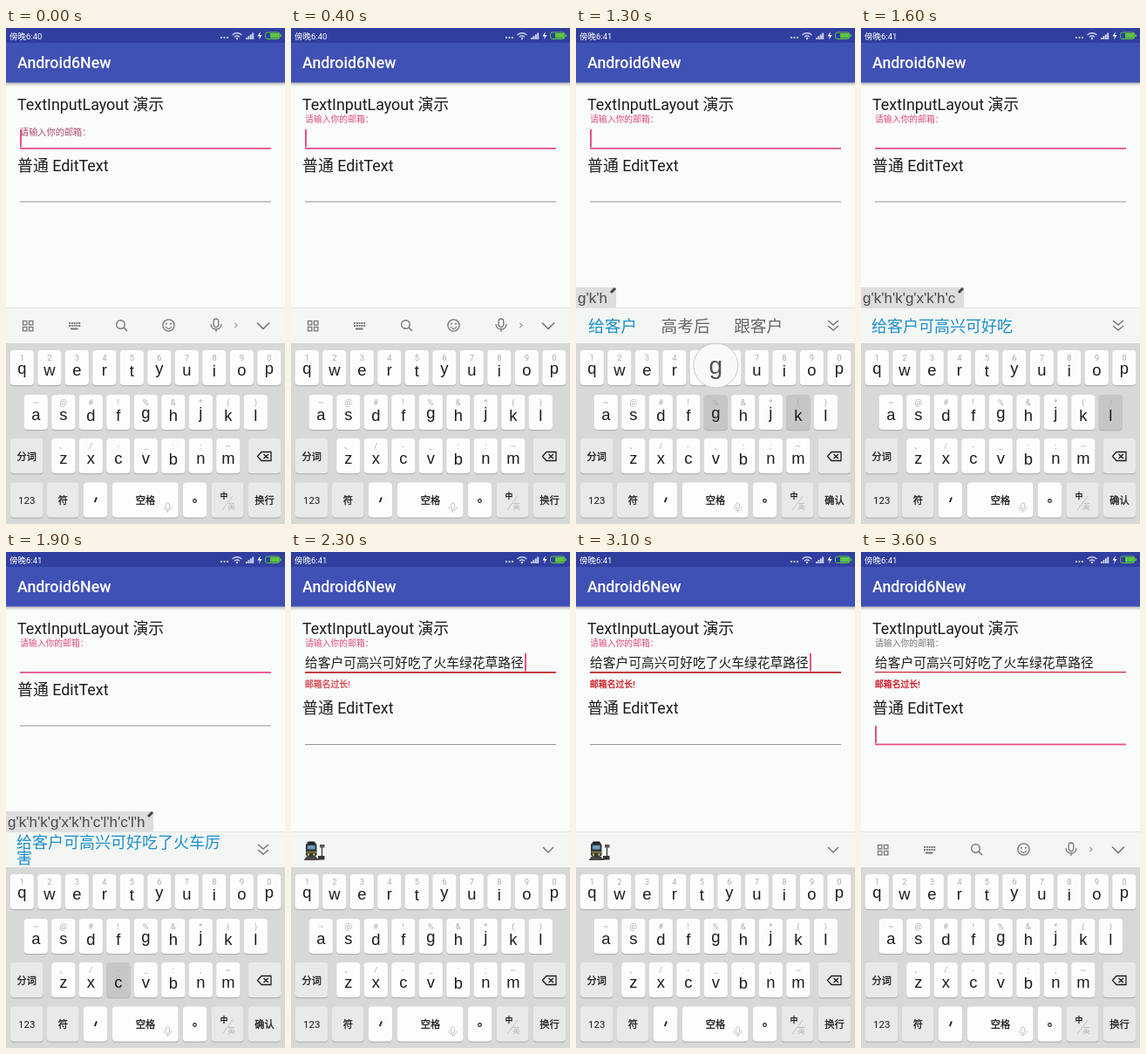
Recreate the animation shown at these times as an HTML page. Size 320 by 568 pixels, loop 4000 ms.

```html
<!DOCTYPE html>
<html lang="zh-CN">
<head>
<meta charset="utf-8">
<style>
  html, body { margin: 0; width: 100%; height: 100%; overflow: hidden; }
  body { position: relative; font-family: Roboto, "Noto Sans CJK SC", "Noto Sans CJK", sans-serif; }
  svg { display: block; width: 320px; height: 568px; }
  .latin, #pinyin { font-family: "Liberation Sans", Arial, sans-serif; }
  .label { stroke: #1c1c1c; stroke-width: .3px; }
  .error { stroke: #cc1420; stroke-width: .3px; }
  #pinyin {
    position: absolute; left: 0; top: 297px; height: 23px; padding: 0 10px 0 2px;
    font-size: 17px; line-height: 25px; color: #4a4a4a; background: #dcdddc; white-space: nowrap;
  }
  #pinyin::after {
    content: ""; position: absolute; right: 2px; top: 0; width: 3px; height: 7px;
    background: #444; transform: rotate(45deg);
  }
  #words {
    position: absolute; left: 14px; top: 322px; height: 40px; max-width: 236px;
    display: flex; align-items: center; gap: 27.5px; color: #666; white-space: nowrap;
    font-size: 18.7px; line-height: 18px;
  }
  #words.long { left: 12px; white-space: normal; font-size: 18px; }
  #words :first-child { color: #1d8fcb; }
</style>
</head>
<body>
<svg id="screen" viewBox="0 0 320 568"></svg>
<div id="pinyin"></div>
<div id="words"></div>
<script>
const LOOP = 4000, STEP = 100;
const COMMIT = 2200, REFOCUS = 3400;
const PINK = '#e4528c', RED = '#c02a30', GREY = '#777';
const SENTENCE = '给客户可高兴可好吃了火车厉害';
const ENTRY = '给客户可高兴可好吃了火车绿花草路径';
const LETTERS = 'gkhkgxkhclhclhclj';
const ROWS = [
  ['qwertyuiop', '1234567890', 18.3, 369],
  ['asdfghjkl', '~@#!%&*()', 34.3, 420],
  ['zxcvbnm', '、/-_:;~', 65.8, 470],
];
const $ = id => document.getElementById(id);

const rect = (x, y, w, h, fill, more = '') =>
  `<rect x="${x}" y="${y}" width="${w}" height="${h}" fill="${fill}" ${more}/>`;
const text = (x, y, size, fill, str, more = '') =>
  `<text x="${x}" y="${y}" font-size="${size}" fill="${fill}" ${more}>${str.replace('&', '&amp;')}</text>`;
const mid = (x, y, size, fill, str, more = '') =>
  text(x, y, size, fill, str, 'text-anchor="middle" ' + more);
const line = (d, stroke, width = 1.4, more = '') =>
  `<path d="${d}" fill="none" stroke="${stroke}" stroke-width="${width}" ${more}/>`;
const dot = (x, y, r, fill, more = '') =>
  `<circle cx="${x}" cy="${y}" r="${r}" fill="${fill}" ${more}/>`;

const key = (x, y, w, fill = '#fcfdfc') =>
  rect(x, y + 1.3, w, 40, '#b3b5b3', 'rx="4"') + rect(x, y, w, 40, fill, 'rx="4"');

const mic = (x, y, s, color) =>
  `<g transform="translate(${x} ${y}) scale(${s})">` +
  rect(-2.8, -7, 5.6, 9.5, 'none', `rx="2.8" stroke="${color}" stroke-width="1.3"`) +
  line('M-6-1C-6 7 6 7 6-1M0 5V8', color, 1.3) + '</g>';

function statusBar(t) {
  const pale = '#cdd2ee', green = '#5cc443';
  return rect(0, 0, 320, 17, '#303f9f') +
    text(4, 12.5, 9.5, '#fff', t < 1000 ? '傍晚6:40' : '傍晚6:41') +
    [247, 250.5, 254].map(x => dot(x, 11, 1, '#fff')).join('') +
    line('M259.5 8Q265 3.5 270.5 8M262 10.2Q265 7.8 268 10.2', pale, 1.3) + dot(265, 12, 1.2, pale) +
    [0, 1, 2, 3].map(i => rect(275 + i * 2.4, 11 - i * 1.8, 2, 2 + i * 1.8, pale)).join('') +
    '<path d="M292 4L288.5 9.5H291L290 13.5L293.5 8H291Z" fill="#fff"/>' +
    rect(297.5, 5, 16.5, 7.5, 'none', `rx="2.5" stroke="${green}"`) +
    rect(303, 6, 10.5, 5.5, green) + rect(314.5, 7.5, 1.5, 2.5, green);
}

function form(t) {
  const done = t >= COMMIT, second = t >= REFOCUS;
  const drop = done ? 21.5 : 0;
  const caretOn = t % 1000 < 500;
  const hint = t < STEP ? [16, 122.8, 10.2, '#b04a70'] : [16, 107.8, 9.84, second ? GREY : '#e0487f'];
  let out = text(13, 94, 17.9, '#1c1c1c', 'TextInputLayout 演示') +
    text(...hint, '请输入你的邮箱：') +
    rect(16, 137, 288, second ? 1.2 : 1.8, done ? RED : PINK) +
    text(13, 163.8 + drop, 17.9, '#1c1c1c', '普通 EditText') +
    (second ? rect(16, 219.5, 288, 1.8, PINK) : rect(16, 198.5 + drop, 288, 1, '#949494'));
  if (done) {
    out += text(16, 131.8, 14.76, '#1c1c1c', ENTRY) +
      text(16, 155.2, 9.84, '#cc1420', '邮箱名过长!', `class="error" opacity="${Math.min(1, (t - 2100) / 250)}"`);
  }
  if (second) out += rect(16, 199, 2, 20, PINK);
  else if (caretOn) out += rect(done ? 268 : 16, 116, 2, 20.5, PINK);
  return out;
}

function train() {
  return rect(17, 333, 12.5, 16, '#2f3b3f', 'rx="3"') + rect(19, 331.5, 8.5, 3, '#222', 'rx="1"') +
    rect(19, 336, 8.5, 4.5, '#6f9dba', 'rx="1"') + rect(17.5, 343, 11.5, 1.5, '#9a7a3a') +
    dot(20, 346.5, 1.2, '#e0b84b') + dot(26.5, 346.5, 1.2, '#e0b84b') +
    '<path d="M17.5 349H29L32 353H14.500Z" fill="#4a4542"/>' +
    line('M35.500 337V349', '#444', 1.5) + rect(33, 335, 5.5, 3.5, '#555') + rect(31, 348, 7.5, 4.5, '#333');
}

function toolbar(t, composing) {
  let out = rect(0, 320, 320, 41, '#f4f6f4') + rect(0, 320, 320, 1, '#e2e4e2');
  if (composing) return out + line('M289 335L295 340L301 335M289 341L295 346L301 341', GREY, 1.5);
  if (t >= COMMIT && t < REFOCUS) return out + train() + line('M289 338L295 344L301 338', GREY, 1.5);
  for (const x of [19.5, 26.5]) for (const y of [335.5, 342.5])
    out += rect(x, y, 4.4, 4.4, 'none', `stroke="${GREY}" stroke-width="1.3"`);
  for (let i = 0; i < 10; i++)
    out += rect(72 + i % 5 * 2.8, 337 + (i / 5 | 0) * 3, 2, 2, GREY);
  return out + rect(74, 343.5, 8.5, 2, GREY) +
    dot(131.5, 339.5, 4.8, 'none', `stroke="${GREY}" stroke-width="1.4"`) + line('M135 343L139 347', GREY, 1.6) +
    dot(186.5, 340.5, 6.6, 'none', `stroke="${GREY}" stroke-width="1.4"`) +
    dot(184, 338.8, 1, GREY) + dot(189, 338.8, 1, GREY) + line('M183 342Q186.5 347 190 342', GREY, 1.3) +
    mic(241, 340, 1, GREY) + line('M262.5 338L265 340.5L262.5 343', '#999', 1.1) +
    line('M288 337.5L295 344.5L302 337.5', GREY, 1.7);
}

function keyboard(composing, pressed, popup) {
  const side = '#e8eae8', ink = '#1c1c1c';
  const label = (x, y, str) => mid(x, y, 11.2, ink, str, 'class="label"');
  let out = rect(0, 361, 320, 207, '#d7d9d7'), bubble = '';
  for (const [letters, marks, x0, y] of ROWS) [...letters].forEach((c, i) => {
    const x = x0 + i * 31.5;
    const shift = 'gjpqy'.includes(c) ? -2 : 'tdfhiklb'.includes(c) ? 1 : 0;
    out += key(x - 13.6, y, 27.2, pressed.includes(c) ? '#c5c7c5' : undefined) +
      mid(x, y + 12, 9.5, '#adadad', marks[i]) +
      mid(x, y + 28.7 + shift, 18.4, '#1c1c1c', c, 'class="latin"');
    if (c === popup) bubble = dot(x, y - 33.5, 25.5, '#f8f9f8', 'stroke="#c8c8c8"') +
      mid(x, y - 24.5, 28, '#505050', c, 'class="latin"');
  });
  out += key(5, 470, 37.5, side) + label(23.7, 494.5, '分词') +
    key(277.5, 470, 37.5, side) +
    line('M288.5 490.5L293 485.5H304V495.5H293ZM295.5 488L301 493M301 488L295.5 493', ink, 1.3) +
    key(5, 520.5, 37.5, side) + mid(23.7, 545.3, 11.5, ink, '123') +
    key(47, 520.5, 36.5, side) + label(65.3, 545, '符') +
    key(89, 520.5, 27) + line('M104 537.5L101.8 543', ink, 1.9) +
    key(122, 520.5, 75.5) + label(160, 545, '空格') + mic(185.5, 549, .75, '#c2c2c2') +
    key(203, 520.5, 27) + dot(216.5, 541.5, 1.8, 'none', `stroke="${ink}" stroke-width="1.2"`) +
    key(235.5, 520.5, 37, side) + mid(250, 538.5, 9, ink, '中', 'font-weight="bold"') +
    line('M248 552L260 536', '#bbb', .9) + mid(258.5, 550.5, 8.5, '#b2b2b2', '英') +
    key(278, 520.5, 37, side) + label(296.5, 545, composing ? '确认' : '换行');
  return out + bubble;
}

function render(t) {
  const typed = Math.round(3 + 11 * (t - 1300) / 600);
  const composing = typed > 0 && t < COMMIT;
  const n = Math.min(typed, LETTERS.length);
  const popup = composing && t / STEP % 4 === 1 ? LETTERS[n + 1] || '' : '';
  const pressed = composing ? (LETTERS[n] || '') + popup : '';

  $('screen').innerHTML =
    '<defs><linearGradient id="shade" x2="0" y2="1"><stop stop-opacity=".28"/><stop offset="1" stop-opacity="0"/></linearGradient></defs>' +
    rect(0, 0, 320, 568, '#fafcfa') + form(t) + rect(0, 62, 320, 5, 'url(#shade)') +
    rect(0, 16, 320, 46.5, '#3f51b5') + statusBar(t) +
    text(13, 46, 17.8, '#fff', 'Android6New', 'font-weight="500"') +
    toolbar(t, composing) + keyboard(composing, pressed, popup);

  $('pinyin').hidden = !composing;
  $('words').style.display = composing ? '' : 'none';
  if (!composing) return;
  $('pinyin').textContent = [...LETTERS.slice(0, n)].join("'");
  const long = n > 3;
  const words = long ? [(n > 14 ? ENTRY : SENTENCE).slice(0, n)]
    : ['给客户', '高考后', '跟客户'].map(w => w.slice(0, n));
  $('words').className = long ? 'long' : '';
  $('words').innerHTML = words.map(w => `<span>${w}</span>`).join('');
}

const start = performance.now();
let shown = -1;
function tick() {
  const t = Math.floor((performance.now() - start) % LOOP / STEP) * STEP;
  if (t !== shown) render(shown = t);
  requestAnimationFrame(tick);
}
tick();
</script>
</body>
</html>
```
